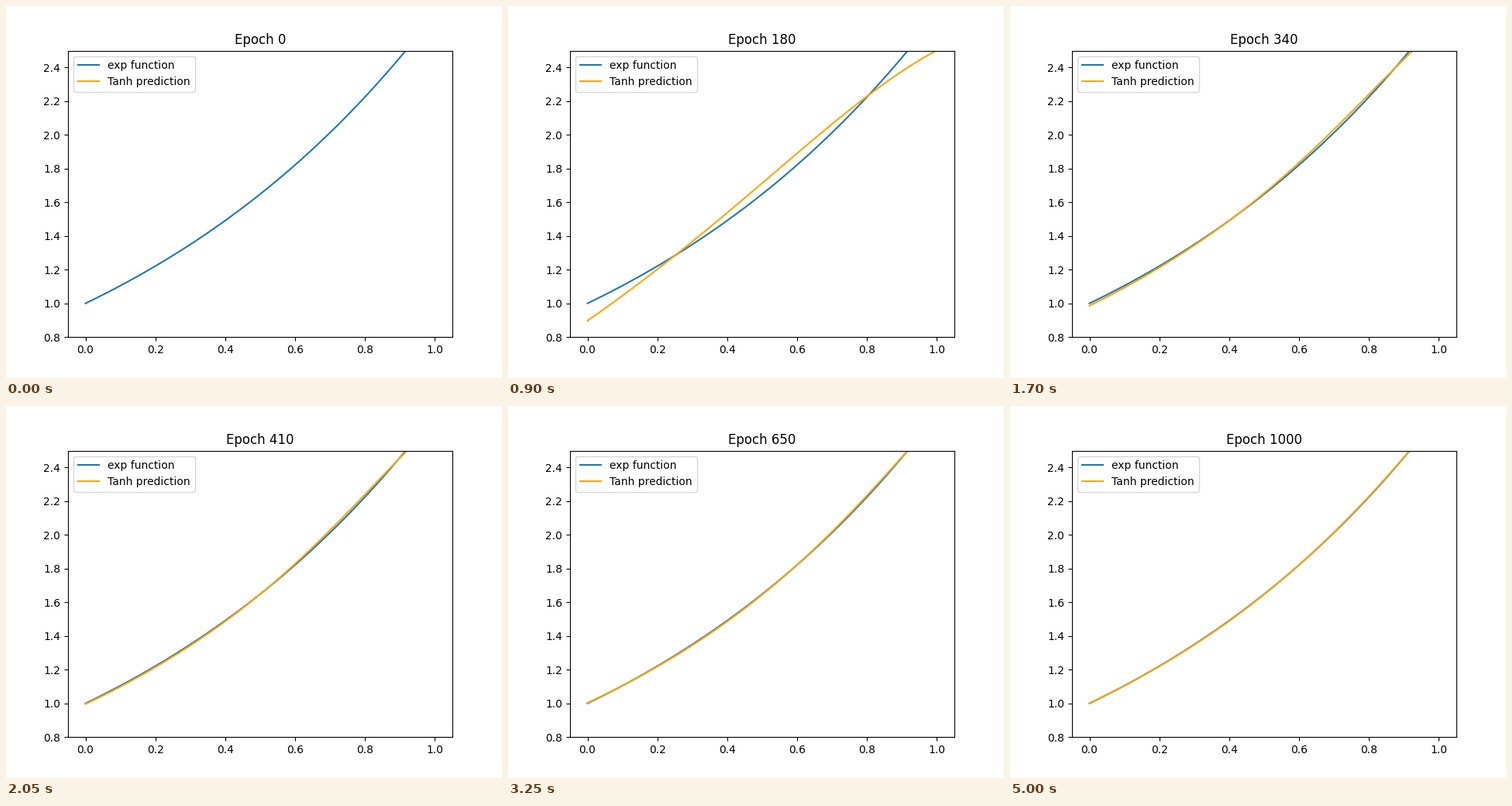
A matplotlib script for the animation above (5050 ms loop, 640 by 480 pixels).

```python
import numpy as np
import matplotlib.pyplot as plt
from matplotlib.animation import FuncAnimation

FRAMES, STEP = 101, 10
GROWN = 90      # the prediction reaches its steep tanh shape
SETTLED = 180   # from here the remaining error decays

x = np.linspace(0, 1, 100)
target = np.exp(x)
steep = 1.15 + 1.655 * np.tanh(1.3 * (x - 0.2))
# Two error shapes, given by their zeros
bend = -(x - 0.25) * (x - 0.805) * (0.5 + 0.4 * x + 0.57 * x**2)
wiggle = -(x - 0.1) * (x - 0.6) * (x - 0.924) * (x**2 + 0.1)


def predict(epoch):
    if epoch < GROWN:
        return steep * (1 - 0.9 * (1 - epoch / GROWN) ** 1.3)
    left = min(1, np.exp((SETTLED - epoch) / 100))
    ripple = 3.5 * (1 - left) * np.exp(-epoch / 400)
    learned = target + left * bend + ripple * wiggle
    return learned + (steep - learned) * np.exp((GROWN - epoch) / 22)


fig, ax = plt.subplots(figsize=(6.4, 4.8), dpi=100)
ax.plot(x, target, label="exp function")
fit, = ax.plot(x, predict(0), color="orange", label="Tanh prediction")
ax.set_xlim(-0.05, 1.05)
ax.set_ylim(0.8, 2.5)
ax.legend(loc="upper left")
title = ax.set_title("Epoch 0")


def update(i):
    epoch = i * STEP
    fit.set_ydata(predict(epoch))
    title.set_text(f"Epoch {epoch}")
    return fit, title


anim = FuncAnimation(fig, update, frames=FRAMES, interval=50,
                     repeat=True, repeat_delay=0, blit=False)
plt.show()
```
